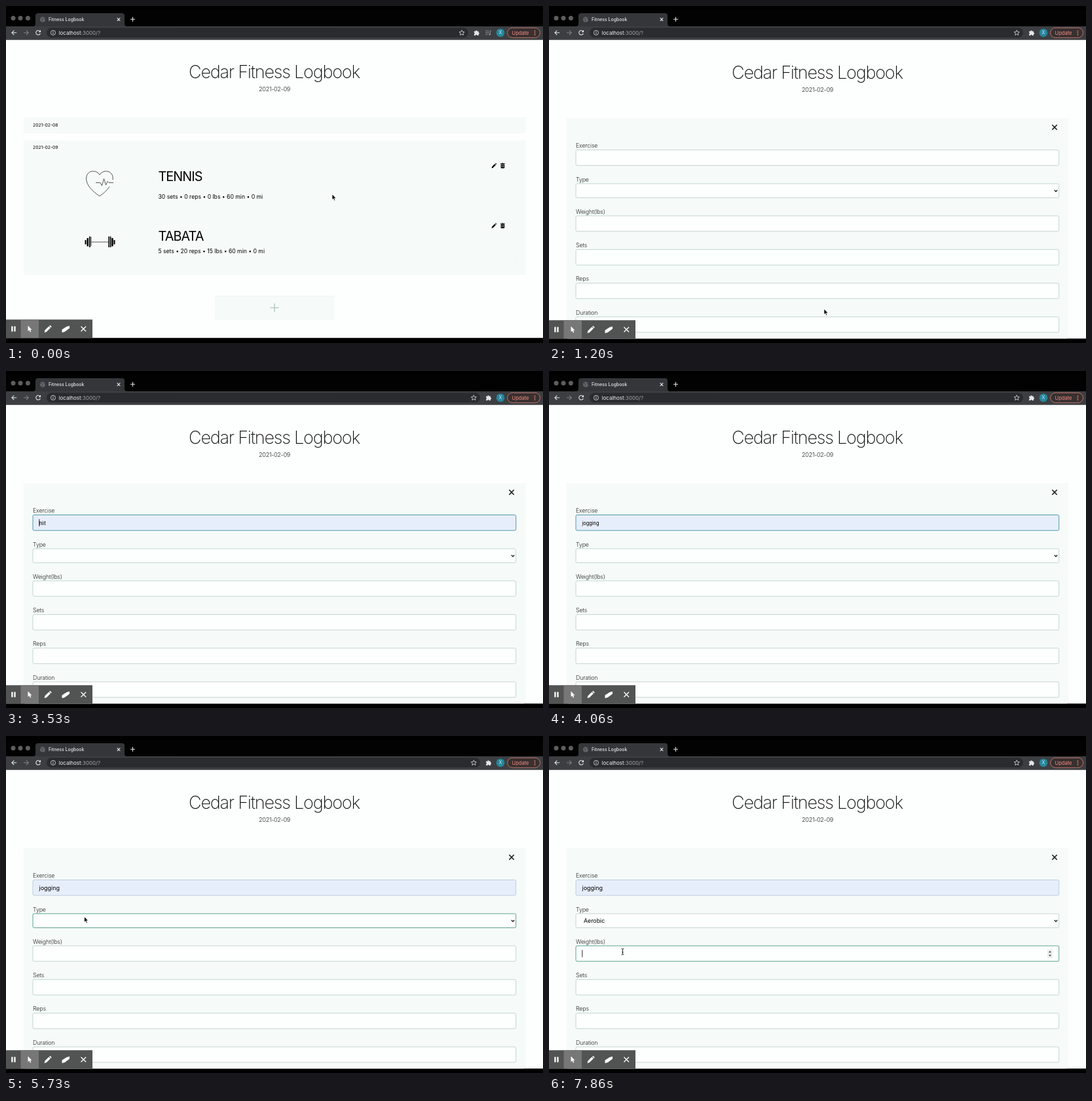
Animation of 820 by 514 pixels, one loop 8 s. Source, as an HTML page:

```html
<!DOCTYPE html>
<html lang="en">
<head>
<meta charset="utf-8">
<title>Fitness Logbook</title>
<style>
  html, body { margin: 0; width: 100%; height: 100%; overflow: hidden; background: #000; }
  svg { display: block; font-family: Inter, "Open Sans", sans-serif; }
  .panel { fill: #f6fbf9; filter: drop-shadow(0 .9px .7px rgba(30, 60, 50, .18)); }
  .line { fill: none; stroke: #e4e5e7; stroke-width: 1.1; }
  .ink { fill: none; stroke: #222; stroke-width: .75; }
  .heading { font-size: 19.8px; letter-spacing: -.9px; }
  .stats { font-size: 8.62px; }
  .day { font-size: 6.8px; }
  .label { font-size: 8.8px; font-weight: 300; letter-spacing: -.15px; fill: #222; }
  .field { fill: #fdfefe; stroke: #bfd3cb; stroke-width: .9; }
</style>
</head>
<body>
<svg width="820" height="514" viewBox="0 0 820 514">
  <defs>
    <clipPath id="view"><path d="M0 51.7H820V514H0z"/></clipPath>
    <g id="tools">
      <path d="M-3.3 3.8l.6-2.4L1.6-2.9 3.2-1.3-1.2 3.1zM2.2-3.5l.8-.8 1.6 1.6-.8.8z"/>
      <path d="M10.8-2.2h5.6v5.2q0 .8-.8.8h-4q-.8 0-.8-.8zM10.3-3.6h2l.5-.6h1.6l.5.6h2v.8h-6.600z"/>
      <path d="M12.5-1v3.2M14.700-1v3.2" stroke="#f6fbf9" stroke-width=".7"/>
    </g>
    <path id="arrow" d="M0 0V8.6L2 6.8 3.4 9.9 4.8 9.3 3.4 6.3H6z"/>
  </defs>

  <!-- browser -->
  <path d="M0 6H820V31H0z" fill="#020202"/>
  <path d="M41 31q4 0 4-4V15q0-4 4-4H177q4 0 4 4v12q0 4 4 4z" fill="#35363a"/>
  <path d="M0 31H820V52H0z" fill="#3d3e41"/>
  <g fill="#5d5e60"><circle cx="11" cy="18.6" r="3.5"/><circle cx="22" cy="18.6" r="3.5"/><circle cx="33.4" cy="18.6" r="3.5"/></g>
  <circle cx="56" cy="20.5" r="4" fill="#65676a"/>
  <path d="M53 18.5l2 .5 1 2-1 2M57 17l2 2 .5 2" fill="none" stroke="#3b3c40"/>
  <text x="65" y="23" font-size="6.9" font-weight="500" fill="#e8eaed">Fitness Logbook</text>
  <path class="line" d="M169.7 18.2l4.6 4.6m0-4.6l-4.6 4.6M190 20.3h7M193.5 16.8v7"/>
  <path class="line" d="M16.2 40.7H9M12.3 37.3L8.9 40.7l3.4 3.4M52 38.7a3.4 3.4 0 1 0 .4 3M52.5 37v2.5H50"/>
  <path class="line" d="M27 40.7h7.2M30.9 37.3l3.4 3.4-3.4 3.4" style="stroke:#7d7f83"/>
  <rect id="pill" x="62" y="33.3" width="644" height="14.8" rx="7.4" fill="#2a2b2e"/>
  <circle class="line" cx="72" cy="40.8" r="3.6" style="stroke-width:.8"/>
  <path class="line" d="M72 40.2v2.6M72 38.5v1" style="stroke-width:.9"/>
  <text x="80.5" y="43.6" font-size="8" fill="#f1f3f4">localhost<tspan fill="#a5a9ae">:3000/?</tspan></text>
  <g id="icons">
    <path class="line" d="M696 36.8l1.2 2.6 2.8.3-2.1 1.9.6 2.8-2.5-1.5-2.5 1.5.6-2.8-2.1-1.9 2.8-.3z" style="stroke-width:.8"/>
    <path d="M714.8 38.5h2.2a1.2 1.2 0 0 1 2.4 0h2.2v2a1.2 1.2 0 0 1 0 2.4V45h-2.2a1.2 1.2 0 0 0-2.4 0h-2.2v-2.2a1.2 1.2 0 0 0 0-2.3z" fill="#e4e5e7"/>
  </g>
  <g id="queue" fill="#8f9296">
    <path class="line" d="M732 38h6M732 40.6h6M732 43.2h4M739.5 43V38h1.7" style="stroke:#8f9296;stroke-width:.9"/>
    <circle cx="738.6" cy="43.3" r="1.3"/>
  </g>
  <circle cx="755" cy="40.8" r="6.4" fill="#26869b"/>
  <text x="755" y="43.3" font-size="7" fill="#d9edf1" text-anchor="middle">X</text>
  <rect x="765.7" y="33.3" width="49.8" height="15" rx="7.5" fill="#38302f" stroke="#c97972" stroke-width=".9"/>
  <text x="772.5" y="43.6" font-size="7.6" fill="#f28b82">Update</text>
  <path d="M807.5 37.5v7" stroke="#f28b82" stroke-width="1.5" stroke-dasharray="1.4 1.4"/>

  <!-- page -->
  <g clip-path="url(#view)">
    <g id="page">
      <path d="M0 50H820V507.2H0z" fill="#fdfefe"/>
      <text x="409.5" y="111" font-size="27" font-weight="200" letter-spacing="-1.2" text-anchor="middle" fill="#111">Cedar Fitness Logbook</text>
      <text x="410" y="131.3" font-size="9.1" font-weight="300" letter-spacing="-.3" text-anchor="middle" fill="#222">2021-02-09</text>

      <g id="list">
        <rect class="panel" x="27" y="171" width="766" height="23.3" rx="2"/>
        <text class="day" x="41" y="185.2">2021-02-08</text>
        <rect class="panel" x="27" y="206" width="766" height="205" rx="2"/>
        <text class="day" x="41" y="219.3">2021-02-09</text>
        <rect class="panel" x="41" y="233" width="738" height="80" rx="2"/>
        <rect class="panel" x="41" y="324" width="738" height="69" rx="2"/>
        <path class="ink" d="M163.2 266C164 257 158.500 253 153 253C148.500 253 145 255 143 258.500C141 255 137.500 253 133 253C127 253 122.600 257.500 122.600 264C122.600 274.500 132 283.500 142.800 291C149 287 154.500 282 158 276.500M137 270.500H144L146.500 275 149.500 264.500 152.500 274 155 268.500 157 270.500H164"/>
        <path d="M120.500 358h2v6.500h-2zM123.500 355h2.500v12.500h-2.500zM127 352.500h1.700v16.500H127zM129.500 353h.8v14h-.8zM156.300 352.500h1.500v16.500h-1.500zM158.700 352.500h1.700v16.500h-1.700zM161.200 355h2.500v12.500h-2.500zM164.500 358h2v6.500h-2z"/>
        <path class="ink" d="M130 361H157"/>
        <text class="heading" x="232.5" y="268">TENNIS</text>
        <text class="stats" x="232.5" y="295.3">30 sets • 0 reps • 0 lbs • 60 min • 0 mi</text>
        <text class="heading" x="232.5" y="359.3">TABATA</text>
        <text class="stats" x="232.5" y="378">5 sets • 20 reps • 15 lbs • 60 min • 0 mi</text>
        <use href="#tools" x="744.8" y="244.7"/>
        <use href="#tools" x="744.8" y="336.2"/>
        <rect class="panel" x="319" y="443.5" width="182" height="36.5" rx="2"/>
        <path d="M403.5 461.3h13M410 454.8v13" stroke="#b5cdc3" stroke-width="1.6"/>
      </g>

      <g id="form">
        <rect class="panel" x="27" y="171" width="766" height="336.2" rx="2"/>
        <path d="M768.3 181.3l7.4 7.4m0-7.4l-7.4 7.4" stroke="#111" stroke-width="1.5"/>
        <g id="fields"></g>
        <path class="ink" d="M771.7 280.7l2.3 2.3 2.3-2.3" style="stroke-width:1.4"/>
        <text id="exercise" x="50.5" y="235"></text>
        <text id="type" x="53" y="285" font-size="8.8">Aerobic</text>
        <g id="spinner">
          <path d="M761 325.5h8v13h-8z" fill="#ececec"/>
          <path d="M763 330.2l2-2.5 2 2.5zM763 333.8l2 2.5 2-2.5z" fill="#444"/>
        </g>
        <path id="caret" d="M0 0v11" stroke="#111" stroke-width=".9"/>
      </g>

      <!-- recorder bar -->
      <path d="M0 479.2H132V507.2H0z" fill="#525353"/>
      <path d="M22.5 479.2H50V507.2H22.5z" fill="#777"/>
      <g fill="#fff">
        <path d="M8.2 489.5h2.3v8H8.2zM12.3 489.5h2.3v8h-2.3z"/>
        <use href="#arrow" x="33.5" y="488.5"/>
        <path d="M58.5 499l.9-3.4 6-6 2.5 2.5-6 6zM66.1 488.9l1.2-1.2 2.5 2.5-1.2 1.2z"/>
        <path d="M85.5 494.5l7-4.5 4.5-1.2v3.7l-7.5 5.5-4 1z"/>
        <path d="M114.5 489.7l7.6 7.6m0-7.6l-7.6 7.6" stroke="#fff" stroke-width="1.3"/>
      </g>
    </g>
  </g>

  <g id="cursor">
    <use id="pointer" href="#arrow" stroke="#fff" stroke-width=".7"/>
    <path id="beam" d="M-1.9-4.6Q0-4.6 0-3.5Q0-4.6 1.9-4.6M0-3.8V3.8M-1.9 4.6Q0 4.6 0 3.5Q0 4.6 1.9 4.6M-1.2.8h2.4" fill="none" stroke="#111" stroke-width=".9"/>
  </g>
</svg>
<script>
const $ = id => document.getElementById(id);
const show = (id, on) => $(id).setAttribute('display', on ? 'inline' : 'none');
const move = (id, x, y) => $(id).setAttribute('transform', `translate(${x} ${y})`);

// name, top, height
const fields = [
  ['Exercise', 219.5, 23.7], ['Type', 271, 21.5], ['Weight(lbs)', 320, 23.7],
  ['Sets', 371.4, 23.7], ['Reps', 422.7, 23.7], ['Duration', 474.1, 23.7]
];
$('fields').innerHTML = fields.map(([name, y, h]) =>
  `<text class="label" x="41" y="${y - 3.5}">${name}</text>
   <rect class="field" x="41" y="${y}" width="737.7" height="${h}" rx="2"/>`).join('');
const boxes = [...document.querySelectorAll('.field')];

// time, x, y
const path = [
  [0, 498, 287], [60, 498, 287], [260, 464, 358], [400, 429.5, 424], [860, 420, 462],
  [1660, 420, 462], [1860, 316, 213], [2060, 280, 215], [2260, 275.5, 225],
  [2740, 275.5, 225], [3130, 115, 257], [4740, 112, 300], [5000, 115, 319.5],
  [5340, 116, 321], [5660, 119.5, 275.5], [6140, 119.5, 275.5], [6660, 112, 290],
  [7060, 111, 303], [7260, 112, 318], [7460, 112.5, 329], [8000, 112.5, 329]
];

function pointAt(t) {
  const i = path.findIndex(p => p[0] > t);
  const [a, b] = [path[i - 1], path[i]];
  const k = (t - a[0]) / (b[0] - a[0]);
  return [a[1] + (b[1] - a[1]) * k, a[2] + (b[2] - a[2]) * k];
}

function draw(t) {
  const open = t >= 1200;
  const filled = t >= 3400;
  const chosen = t >= 4600;
  const focus = t < 2400 ? -1 : t < 5460 ? 0 : t < 6800 ? 1 : t < 7460 ? -1 : 2;

  move('page', 0, Math.min(0, Math.max(0, t - 60) / 340 - 1));
  show('list', !open);
  show('form', open);
  show('queue', !open);
  move('icons', open ? 18.3 : 0, 0);
  $('pill').setAttribute('width', open ? 662 : 644);

  boxes.forEach((box, i) => {
    const auto = i === 0 && filled;
    box.style.fill = auto ? '#e7eefb' : '';
    box.style.stroke = i === focus ? (auto ? '#43909f' : '#4c9b87') : auto ? '#b8cad8' : '';
  });
  const text = $('exercise');
  text.textContent = !filled ? '' : t < 4060 ? 'hiit' : 'jogging';
  text.setAttribute('font-size', chosen ? 9 : 7.4);
  show('type', t >= 6800);
  show('spinner', focus === 2);

  const start = focus === 2 ? 7460 : chosen ? 4600 : 2400;
  show('caret', (focus === 0 || focus === 2) && (t - start) % 1000 < 500);
  move('caret', focus === 0 && chosen ? 82 : 50.8, focus === 2 ? 326.3 : 226);

  const [x, y] = pointAt(t);
  const typing = open && fields.some(([name, top, h]) => name !== 'Type' && y > top && y < top + h);
  const overField = typing && !(t > 4700 && t < 5500);
  move('cursor', x, y);
  show('cursor', t < 3400 || t >= 4800);
  show('pointer', !overField);
  show('beam', overField);
}

const begin = performance.now();
function tick() {
  draw((performance.now() - begin) % 8000);
  requestAnimationFrame(tick);
}
tick();
</script>
</body>
</html>
```
